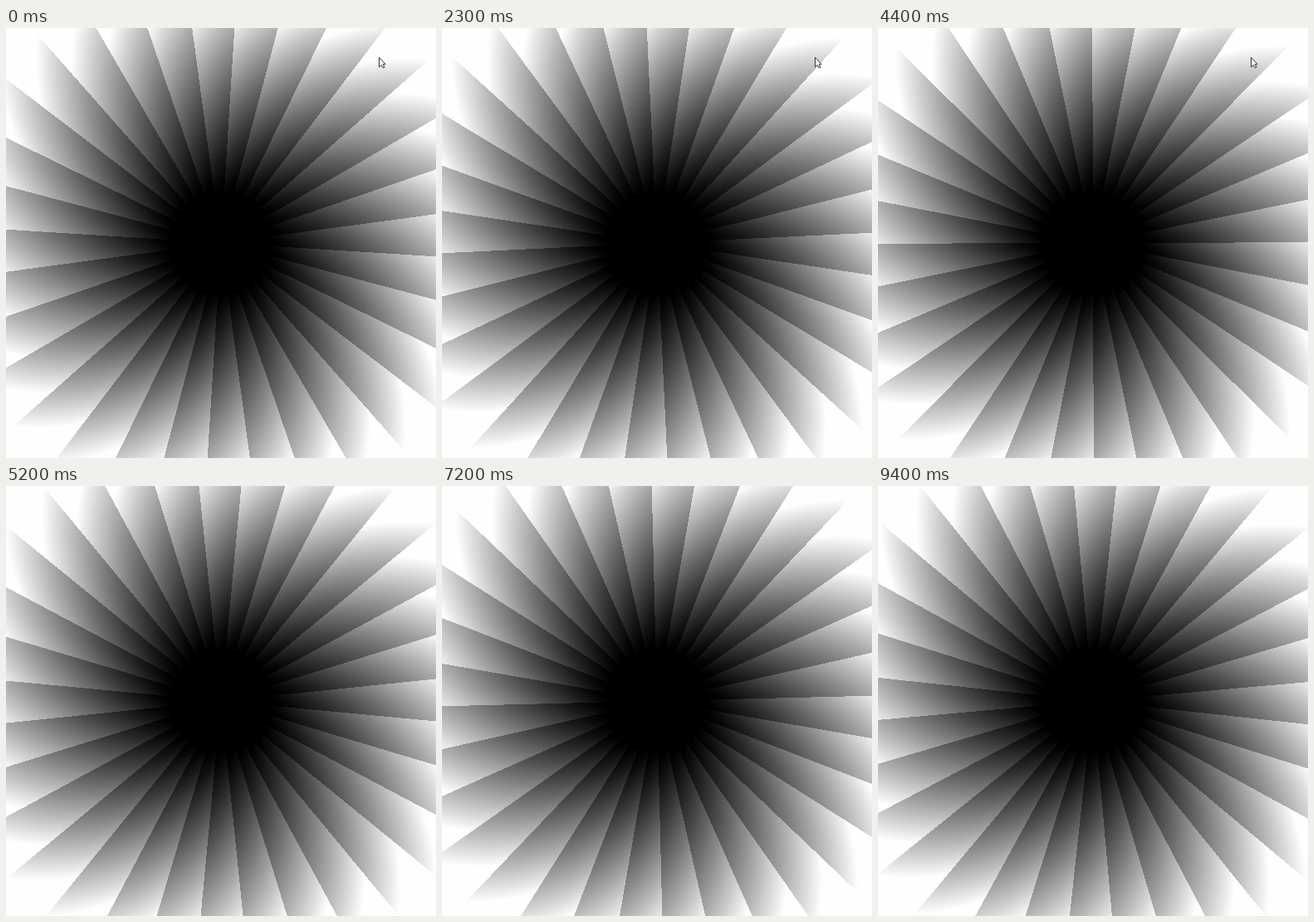
These frames come from a looping animation (518x518 px, 9500 ms). An HTML page with a canvas:

```html
<!DOCTYPE html>
<html lang="en">
<head>
<meta charset="utf-8">
<title>Rotating shaded rays</title>
<style>
  html, body { margin: 0; width: 100%; height: 100%; overflow: hidden; background: #fff; }
  canvas { display: block; }
</style>
</head>
<body>
<canvas id="stage" width="518" height="518"></canvas>
<script>
const SIZE = 518, HALF = SIZE / 2, RAYS = 32;
const STEP = 100, LOOP = 9500, POINTER_END = 5200;

// [time in ms, rotation in ray widths, clockwise]
const SPIN = [
  [0, 0.32], [1600, 9.631], [3100, 18.476], [4400, 25.985],
  [6000, 34.974], [7200, 41.876], [9400, 54.551], [9500, 55.32]
];

const ctx = document.getElementById('stage').getContext('2d');
const image = ctx.createImageData(SIZE, SIZE);
const pixels = new Uint32Array(image.data.buffer);
const radius = new Float32Array(SIZE * SIZE);
const ray = new Float32Array(SIZE * SIZE);

for (let i = 0; i < pixels.length; i++) {
  const x = i % SIZE + 0.5 - HALF;
  const y = Math.floor(i / SIZE) + 0.5 - HALF;
  radius[i] = Math.hypot(x, y);
  ray[i] = Math.atan2(y, x) / (2 * Math.PI) * RAYS;
}

function rotation(time) {
  const next = SPIN.findIndex(([t]) => t > time);
  const [t0, a] = SPIN[next - 1], [t1, b] = SPIN[next];
  return a + (b - a) * (time - t0) / (t1 - t0);
}

// Brightness grows outwards; each ray darkens clockwise across its width.
function shade(r, dark) {
  const level = (r - 58 - 12 * dark) / (215 + 50 * dark);
  if (level <= 0) return 0;
  if (level >= 1) return 254;
  return Math.round(254 * Math.pow(level, 1.1 + 0.15 * dark));
}

const pointer = new Path2D('M449.5 35.5V47L452.2 44.5L454.1 48.1L455.9 47.2L454.2 43.7H457.1Z');

function draw(time) {
  const turn = rotation(time);
  for (let i = 0; i < pixels.length; i++) {
    const pos = ray[i] - turn;
    const dark = pos - Math.floor(pos);
    pixels[i] = 0xff000000 | shade(radius[i], dark) * 0x010101;
  }
  ctx.putImageData(image, 0, 0);
  if (time >= POINTER_END) return;
  ctx.fillStyle = '#fff';
  ctx.fill(pointer);
  ctx.strokeStyle = '#333';
  ctx.stroke(pointer);
}

const start = performance.now();
let shown = -1;

function tick() {
  const elapsed = (performance.now() - start) % LOOP;
  const time = Math.floor(elapsed / STEP) * STEP;
  if (time !== shown) draw(shown = time);
  requestAnimationFrame(tick);
}
tick();
</script>
</body>
</html>
```
